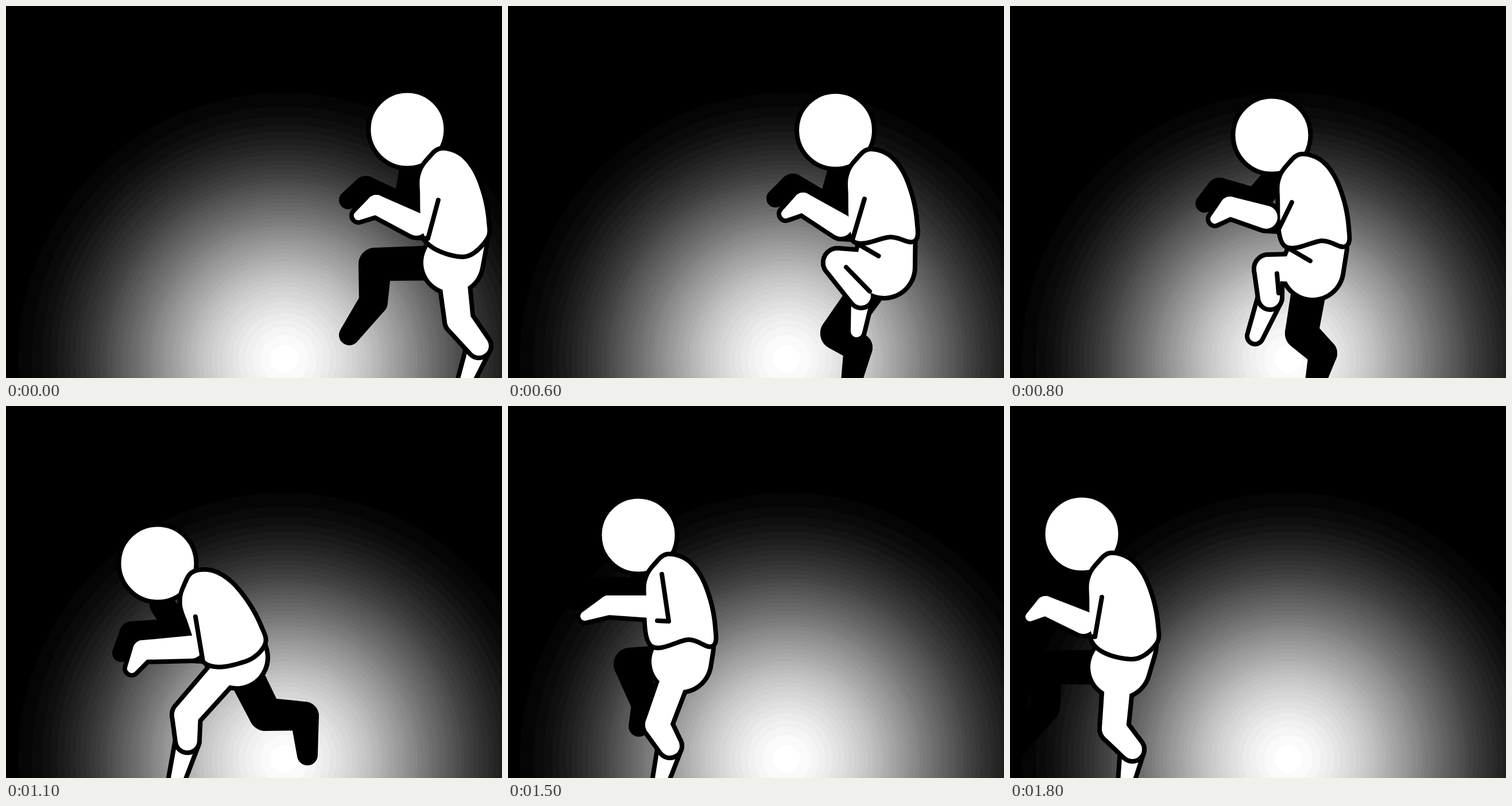
Animation of 864x648 px, one loop 2 s. Source, as an HTML page:

```html
<!DOCTYPE html>
<html lang="en">
<head>
<meta charset="utf-8">
<title>Sneaking figure</title>
<style>
html, body { margin: 0; width: 100%; height: 100%; overflow: hidden; background: #000; }
svg { display: block; width: 100vw; height: 100vh; }
.ink { fill: #000; stroke: #000; stroke-width: 16; stroke-linejoin: round; }
.paper { fill: #fff; }
.line { fill: none; stroke: #000; stroke-width: 8; stroke-linejoin: round; stroke-linecap: round; }
.head { fill: #fff; stroke: #000; stroke-width: 8; }
</style>
</head>
<body>
<svg viewBox="0 0 864 648">
  <defs>
    <radialGradient id="glow" gradientUnits="userSpaceOnUse" cx="485" cy="615" r="464"></radialGradient>
  </defs>
  <rect width="864" height="648" fill="url(#glow)"/>
  <g id="stage"></g>
</svg>
<script>
// Banded glow: brightness falls along a soft S-curve in 50 levels.
function glowStops() {
  const bands = 232;
  let out = "";
  for (let i = 0; i < bands; i++) {
    const t = (i + .5) / bands;
    const light = .35 * (1 + Math.cos(Math.PI * t)) + .3 * (1 - t);
    const v = Math.ceil(light * 50) * 5.1;
    const color = `rgb(${v},${v},${v})`;
    out += `<stop offset="${i / bands}" stop-color="${color}"/>` +
      `<stop offset="${(i + 1) / bands}" stop-color="${color}"/>`;
  }
  return out + '<stop offset="1" stop-color="#000"/>';
}
document.getElementById("glow").innerHTML = glowStops();

const add = (p, x, y) => [p[0] + x, p[1] + y];

// Closed smooth curve through points.
function curve(p) {
  const n = p.length, at = i => p[(i + n) % n];
  let d = "M" + p[0];
  for (let i = 0; i < n; i++) {
    const a = at(i - 1), b = at(i), c = at(i + 1), e = at(i + 2);
    d += `C${add(b, (c[0] - a[0]) / 6, (c[1] - a[1]) / 6)} ` +
      `${add(c, (b[0] - e[0]) / 6, (b[1] - e[1]) / 6)} ${c}`;
  }
  return d + "Z";
}
// Tapered capsule around two circles.
function capsule(p, r, q, s) {
  const dx = q[0] - p[0], dy = q[1] - p[1];
  const dir = Math.atan2(dy, dx);
  const off = Math.acos(Math.max(-1, Math.min(1, (r - s) / Math.hypot(dx, dy))));
  const on = (c, rad, a) => add(c, rad * Math.cos(a), rad * Math.sin(a));
  return `M${on(p, r, dir - off)}L${on(q, s, dir - off)}` +
    `A${s} ${s} 0 ${+(r < s)} 1 ${on(q, s, dir + off)}` +
    `L${on(p, r, dir + off)}A${r} ${r} 0 ${+(r > s)} 1 ${on(p, r, dir - off)}Z`;
}
const chain = (points, radii) => points.slice(1).map((q, i) =>
  capsule(points[i], radii[i], q, radii[i + 1]));

const paths = (cls, list) => list.map(d => `<path class="${cls}" d="${d}"/>`).join("");
const dark = list => paths("ink", list);
const skin = list => dark(list) + paths("paper", list);
const line = (...points) => `<path class="line" d="M${points.join("L")}"/>`;

// Radii along the limbs.
const LEG = [23, 21, 17], FOOT = [17, 10], ARM = [20, 17, 8], SLEEVE = [14, 16, 15, 8];

// Torso outline relative to the head, clockwise from the chest.
const TORSO = [[18, 106], [21, 74], [36, 52], [55, 37], [85, 45], [109, 72],
  [126, 115], [134, 160], [131, 190]];

// arm: shoulder, elbow corner, wrist, hand; legs: knee, ankle, toe.
function figure({ head, shift, lean, sag, hip, arm, near, far }) {
  const a = lean * Math.PI / 180, cos = Math.cos(a), sin = Math.sin(a);
  const place = ([x, y]) =>
    add(head, shift + x * cos - y * sin, x * sin + y * cos);
  const torso = curve([...TORSO, [92, 190 + sag], [28, 189]].map(place));
  const belt = place([28, 194]), waist = place([86, 195]);

  const [shoulder, corner, wrist, hand] = arm;
  const elbow = add(corner, -20, -25);
  const forearm = [elbow, wrist, hand];
  const farArm = [add(head, 8, 72), ...forearm.map(p => add(p, -18, -27))];

  const leg = joints => chain([hip, joints[0], joints[1]], LEG);
  const foot = joints => chain([joints[1], joints[2]], FOOT);
  const [knee, ankle] = near;
  const raised = knee[1] < hip[1] + 20;

  return dark([...chain(farArm, SLEEVE), ...foot(far), ...leg(far)]) +
    `<circle class="head" cx="${head[0]}" cy="${head[1]}" r="67.5"/>` +
    skin(foot(near)) +
    skin([...chain([waist, hip], [45, 50]), ...leg(near)]) +
    (raised ? line(add(knee, 15, 8), add(ankle, 15, -8)) + line(belt, add(belt, 43, 25)) : "") +
    skin([torso, ...chain(forearm, ARM)]) +
    line(shoulder, corner, add(elbow, 0, 24));
}

const reach = {
  head: [699, 215], shift: 4, lean: 0, sag: 28, hip: [777, 447],
  arm: [[753, 338], [735, 405], [645, 346], [614, 365]],
  near: [[789, 548], [824, 592], [800, 655]],
  far: [[643, 450], [640, 515], [598, 573]]
};
const pass = {
  head: [570.5, 216.5], shift: 4, lean: 0, sag: -8, hip: [655, 455],
  arm: [[621, 336], [600, 407], [514, 342], [484, 362]],
  near: [[574, 447], [615, 505], [607, 567]],
  far: [[573, 570], [610, 595], [598, 655]]
};
const lift = {
  head: [456, 225], shift: -4, lean: 0, sag: -10, hip: [527, 458],
  arm: [[491, 342], [466, 393], [383, 349], [357, 371]],
  near: [[450, 458], [453, 508], [427, 575]],
  far: [[508, 570], [545, 605], [532, 655]]
};
const lunge = {
  head: [264, 274], shift: 0, lean: -18, sag: 16, hip: [402, 438],
  arm: [[330, 367], [343, 445], [238, 425], [219, 457]],
  near: [[314, 538], [316, 583], [296, 655]],
  far: [[452, 537], [520, 540], [525, 608]]
};
const stride = {
  head: [227, 225], shift: -4, lean: 0, sag: -12, hip: [300, 445],
  arm: [[268, 293], [280, 375], [175, 347], [134, 366]],
  near: [[260, 555], [282, 592], [265, 655]],
  far: [[213, 450], [240, 520], [228, 558]]
};
const leave = {
  head: [125, 223], shift: -5, lean: 0, sag: 24, hip: [190, 455],
  arm: [[160, 333], [148, 402], [62, 348], [35, 367]],
  near: [[181, 562], [213, 598], [202, 655]],
  far: [[62, 455], [62, 525], [15, 590]]
};

// The same step taken with the other leg, elsewhere on the stage.
const swapped = (pose, x, y) => `<g transform="translate(${x} ${y})">` +
  figure({ ...pose, near: pose.far, far: pose.near }) + "</g>";

// Start time of each step within the loop.
const steps = [
  [0, figure(reach)],
  [200, swapped(lunge, 351, 0)],
  [600, figure(pass)],
  [800, figure(lift)],
  [900, swapped(reach, -311, 7)],
  [1100, figure(lunge)],
  [1500, figure(stride)],
  [1700, swapped(lift, -288, 0)],
  [1800, figure(leave)]
];
const LOOP = 2000;
const stage = document.getElementById("stage");
stage.innerHTML = steps.map(s => `<g visibility="hidden">${s[1]}</g>`).join("");
const layers = [...stage.children];

function draw(ms) {
  const t = ms % LOOP;
  const now = steps.filter(s => s[0] <= t).length - 1;
  layers.forEach((g, i) => g.setAttribute("visibility", i === now ? "visible" : "hidden"));
}
const start = performance.now();
function tick() {
  draw(performance.now() - start);
  requestAnimationFrame(tick);
}
tick();
</script>
</body>
</html>
```
